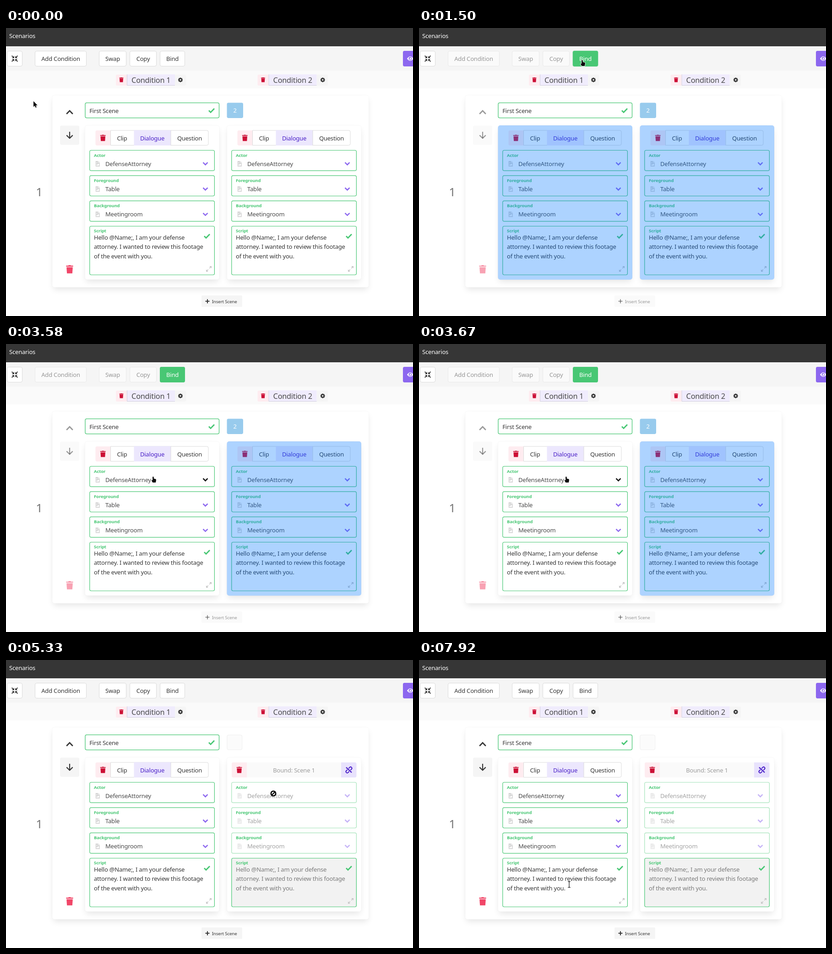
Animation, 889 px wide and 630 px high, one loop 8000 ms. Source, as an HTML page with a canvas:

```html
<!DOCTYPE html>
<html lang="en">
<head>
<meta charset="utf-8">
<title>Scenarios</title>
<style>
html, body { margin: 0; width: 889px; height: 630px; overflow: hidden; background: #fff; }
canvas { display: block; }
</style>
</head>
<body>
<canvas id="stage" width="889" height="630"></canvas>
<script>
const c = document.getElementById('stage').getContext('2d');
const LOOP = 8000, PICK = 1490, LEFT_SET = 3250, BOUND = 4670;
const INK = '#363636', GREEN = '#48c774', PURPLE = '#8c67ef', DEEP = '#4a20c8', RED = '#cc0f35', PINK = '#feecf0';
const STEP = 310, ROW = 55.3;

// pointer path: time, x, y
const PATH = [
  [0, 60, 160], [850, 341, 73], [1250, 357, 70], [2340, 357, 70], [2580, 333, 235], [2670, 329, 263],
  [3100, 322, 290], [3830, 322, 290], [4000, 632, 284], [4250, 583, 290], [5270, 583, 290], [5330, 584, 292],
  [6190, 584, 292], [6330, 500, 180], [6500, 300, 62], [6580, 269, 37], [7000, 131, 162],
  [7400, 500, 300], [7830, 321, 488], [7920, 328, 491], [8000, 328, 491]
];

const clamp = v => Math.max(0, Math.min(1, v));
const ramp = (t, a, b) => clamp((t - a) / (b - a));

// monotone cubic through the path points
function slope(i, k) {
  if (i < 1 || i > PATH.length - 2) return 0;
  const rate = j => (PATH[j + 1][k] - PATH[j][k]) / (PATH[j + 1][0] - PATH[j][0]);
  const a = rate(i - 1), b = rate(i);
  return a * b <= 0 ? 0 : 2 * a * b / (a + b);
}
function pointer(t) {
  t = Math.max(0, t);
  let i = 0;
  while (i < PATH.length - 2 && t > PATH[i + 1][0]) i++;
  const p = PATH[i], q = PATH[i + 1], h = q[0] - p[0], u = clamp((t - p[0]) / h), v = 1 - u;
  return [1, 2].map(k => v * v * (1 + 2 * u) * p[k] + u * u * (3 - 2 * u) * q[k]
    + h * u * v * (v * slope(i, k) - u * slope(i + 1, k)));
}
const inside = (p, x, y, w, h) => p[0] >= x && p[0] < x + w && p[1] >= y && p[1] < y + h;

function fade(a, draw) {
  c.save();
  c.globalAlpha *= a;
  draw();
  c.restore();
}
function at(x, y, draw) {
  c.save();
  c.translate(x, y);
  draw();
  c.restore();
}
function box(x, y, w, h, r, fill, line, lw = 1) {
  c.beginPath();
  c.roundRect(x, y, w, h, r);
  if (fill) { c.fillStyle = fill; c.fill(); }
  if (line) { c.strokeStyle = line; c.lineWidth = lw; c.stroke(); }
}
function text(s, x, y, size = 13.44, color = INK, align = 'left', weight = 400) {
  c.font = `${weight} ${size * .97}px "Noto Sans", sans-serif`;
  c.letterSpacing = -.015 * size + 'px';
  c.textAlign = align;
  c.fillStyle = color;
  c.fillText(s, x, y);
}
function line(color, lw, ...pts) {
  c.beginPath();
  for (let i = 0; i < pts.length; i += 2) c.lineTo(pts[i], pts[i + 1]);
  c.strokeStyle = color;
  c.lineWidth = lw;
  c.stroke();
}
function poly(color, ...pts) {
  c.beginPath();
  for (let i = 0; i < pts.length; i += 2) c.lineTo(pts[i], pts[i + 1]);
  c.closePath();
  c.fillStyle = color;
  c.fill();
}
function card(x, y, w, h) {
  c.save();
  c.shadowColor = 'rgba(10,10,10,.1)';
  c.shadowBlur = 13.4;
  c.shadowOffsetY = 6.7;
  box(x + 1.7, y + 1.7, w - 3.4, h - 3.4, 5, '#fff');
  c.restore();
  box(x - .5, y - .5, w + 1, h + 1, 5, '#fff', 'rgba(10,10,10,.025)');
}

function trash(x, y, w, color) {
  at(x, y, () => {
    box(-w / 2, -w * .52, w, w * .14, w * .05, color);
    box(-w * .17, -w * .58, w * .34, w * .12, w * .04, color);
    poly(color, -w * .44, -w * .3, w * .44, -w * .3, w * .38, w * .57, -w * .38, w * .57);
  });
}
const check = (x, y) => line(GREEN, 2.8, x - 6, y + .3, x - 2, y + 4.2, x + 6, y - 4);
const chevron = (x, y, color) => line(color, 2.5, x - 5, y - 2.3, x, y + 2.7, x + 5, y - 2.3);

function gear(x, y) {
  at(x, y, () => {
    c.beginPath();
    c.arc(0, 0, 3, 0, 7);
    c.strokeStyle = INK;
    c.lineWidth = 2.5;
    c.stroke();
    for (let i = 0; i < 8; i++) {
      c.rotate(Math.PI / 4);
      line(INK, 2, 3, 0, 5.1, 0);
    }
  });
}
function docIcon(x, y) {
  poly('#d6d6d6', x - 4.6, y - 6, x + 1.5, y - 6, x + 4.6, y - 3, x + 4.6, y + 6, x - 4.6, y + 6);
  line('#fff', .9, x + 1.4, y - 6, x + 1.4, y - 2.8, x + 4.6, y - 2.8);
  poly('#fff', x - 3, y + 4, x - 3, y + 2.5, x - 1.5, y + 1, x - .5, y + 2, x + 2, y - .6, x + 3, y + .5, x + 3, y + 4);
  box(x - 3, y - 3, 2, 2, 1, '#fff');
}
function compress(x, y) {
  at(x, y, () => {
    for (let i = 0; i < 4; i++) {
      line(INK, 1.9, 1.6, 1.6, 6.4, 6.4);
      poly(INK, 1.1, 1.1, 6, 1.1, 1.1, 6);
      c.rotate(Math.PI / 2);
    }
  });
}
function expand(x, y) {
  at(x, y, () => {
    for (let i = 0; i < 2; i++) {
      line('#c4c4c4', 1.4, 1.2, -1.2, 5, -5);
      line('#c4c4c4', 1.4, 1.8, -5.2, 5.3, -5.2, 5.3, -1.8);
      c.rotate(Math.PI);
    }
  });
}
function unlink(x, y) {
  at(x, y, () => {
    c.save();
    c.rotate(-Math.PI / 4);
    box(-8, -2.8, 7.6, 5.6, 2.8, null, DEEP, 2);
    box(.4, -2.8, 7.6, 5.6, 2.8, null, DEEP, 2);
    c.restore();
    line('#e8e2fc', 4, -6, -6, 6, 6);
    line(DEEP, 2.2, -6, -5.6, 6, 5.6);
  });
}
function eye(x, y) {
  c.beginPath();
  c.moveTo(x - 7, y);
  c.quadraticCurveTo(x, y - 9.5, x + 7, y);
  c.quadraticCurveTo(x, y + 9.5, x - 7, y);
  c.fillStyle = '#fff';
  c.fill();
  box(x - 3.4, y - 3.4, 6.8, 6.8, 3.4, PURPLE);
  box(x - 2.2, y - 2.2, 4.4, 4.4, 2.2, '#fff');
  box(x - 2.2, y - 2.2, 2.2, 2.2, 1.1, PURPLE);
}

const BUTTONS = [['Add Condition', 63.5, 112], ['Swap', 203.5, 59], ['Copy', 270.5, 58], ['Bind', 336.5, 54]];

function toolbar(t, picking, hot) {
  box(0, 0, 889, 40, 0, INK);
  text('Scenarios', 7, 21.5, 13.44, '#fff');
  box(0, 40, 889, 53, 0, '#f5f5f5');
  box(0, 93, 889, 39, 0, '#fafafa');
  box(2.5, 50.5, 33, 33, 3.4, '#fff', '#dbdbdb');
  compress(19, 67);
  for (const [name, x, w] of BUTTONS) {
    const mid = x + w / 2;
    if (picking && name === 'Bind') {
      if (t < LEFT_SET) box(x - 1.4, 49.2, w + 2.8, 35.6, 4.5, 'rgba(72,199,116,.3)');
      box(x - .5, 50, w + 1, 34, 3.4, GREEN);
      text(name, mid, 72, 13.44, '#fff', 'center');
      continue;
    }
    const over = !picking && inside(hot, x, 50, w, 34);
    fade(picking ? .5 : 1, () => {
      box(x, 50.5, w, 33, 3.4, '#fff', over ? '#a8a8a8' : '#dbdbdb');
      text(name, mid, 72, 13.44, INK, 'center');
    });
  }
  box(867, 50, 40, 34, 3.4, PURPLE);
  eye(883, 67);
}

function heading(n) {
  const d = (n - 1) * 309.5;
  box(240 + d, 102, 24, 24, [3, 0, 0, 3], PINK);
  trash(252 + d, 113.3, 9, RED);
  box(369 + d, 102, 24.5, 24, [0, 3, 3, 0], '#f5f5f5');
  box(264.5 + d, 101.5, 104.5, 24, 0, '#f0ecfd');
  line('#d3d0de', 1, 264.5 + d, 101.5, 264.5 + d, 125.5, 369 + d, 125.5);
  text('Condition ' + n, 316.7 + d, 120, 16.8, '#4a4a4a', 'center');
  gear(381 + d * 1.004, 113.5);
}

function tabs() {
  box(195.5, 224, 33, 33, [3.4, 0, 0, 3.4], PINK);
  box(228.5, 224, 213.5, 32.5, [0, 3.4, 3.4, 0], '#fff', '#dbdbdb');
  box(279.5, 223.5, 80.5, 33.5, 0, '#ece7fd');
  line('#dbdbdb', 1, 360, 224, 360, 257);
  trash(211.7, 240.5, 12, RED);
  text('Clip', 253.5, 245.5, 13.44, INK, 'center');
  text('Dialogue', 319.5, 245.5, 13.44, DEEP, 'center');
  text('Question', 401, 245.5, 13.44, INK, 'center');
}
function boundBar() {
  box(183, 224, 33, 33, [3.4, 0, 0, 3.4], PINK);
  box(216, 224, 206, 33, 0, '#fafafa');
  box(422, 224, 33.5, 33, [0, 3.4, 3.4, 0], '#e8e2fc');
  trash(199.5, 240.5, 12, RED);
  text('Bound: Scene 1', 319, 245.5, 13.44, '#9c9c9c', 'center');
  unlink(439, 240.5);
}

const FIELDS = [['Actor', 'DefenseAttorney'], ['Foreground', 'Table'], ['Background', 'Meetingroom']];
const LINES = ['Hello @Name;, I am your defense', 'attorney. I wanted to review this footage', 'of the event with you.'];
const label = (s, y) => text(s, 192, y, 9.9, GREEN, 'left', 600);

function panel(bound, hot) {
  card(173, 213.5, 292.5, 336.5);
  bound ? boundBar() : tabs();
  FIELDS.forEach(([name, value], i) => {
    const y = 267.5 + i * ROW;
    const over = hot && inside(hot, 182, y, 273, 45);
    fade(bound ? .5 : 1, () => {
      box(182.8, y, 272.6, 44.7, 3.4, '#fff', GREEN, 1.2);
      docIcon(200.3, y + 29.5);
      text(value, 217, y + 34, 13.44, '#4a4a4a');
      chevron(435.5, y + 29, over ? '#111' : PURPLE);
    });
    label(name, y + 14);
  });
  box(182.8, 433.5, 272.6, 106.5, 3.4, bound ? '#f2f2f2' : '#fff', GREEN, 1.2);
  label('Script', 447.3);
  LINES.forEach((s, i) => text(s, 192, 463.3 + i * 20.16, 13.44, bound ? '#7a7a7a' : INK));
  check(439, 455);
  expand(443, 527);
}
function veil(amount) {
  if (amount > 0) {
    c.save();
    c.shadowColor = 'rgba(50,120,240,.6)';
    c.shadowBlur = 4;
    box(172.6, 213.2, 293.2, 337.4, 5, null, 'rgba(90,160,245,.55)', 1.6);
    c.restore();
  }
  box(172.5, 213, 293.5, 337.5, 5, `rgba(0,${120 + 7 * amount},255,${.32 + .07 * amount})`);
}

function tooltip(a) {
  fade(a, () => {
    box(522, 167, 158.5, 26.5, 4, '#3298dc');
    poly('#3298dc', 518, 180, 522, 176, 522, 184);
  });
  fade(Math.min(1, a * 4), () => text('Bound across all conditions', 601, 184.3, 11.4, '#fff', 'center'));
}

function sceneCard(t, picking, bound, hot) {
  card(101.5, 147.5, 690.5, 419.5);
  card(101.5, 628.5, 690.5, 200);
  text('1', 72.5, 368, 26.9, '#757575', 'center');
  fade(picking ? .5 : 1, () => {
    line(INK, 2.7, 132.2, 188, 139, 181, 145.8, 188);
    box(118, 213.5, 42, 42, 3.4, '#f5f5f5');
    line(INK, 2.2, 139, 227, 139, 241);
    line(INK, 2.2, 132.3, 234.6, 139, 241.2, 145.7, 234.6);
    trash(139, 527.8, 15.5, '#f14668');
    box(427, 585, 89, 25, 2, '#f5f5f5');
    line(INK, 2, 435.5, 597.7, 444.5, 597.7);
    line(INK, 2, 440, 593.2, 440, 602.2);
    text('Insert Scene', 449.7, 601.5, 10.08);
  });
  box(173, 163.7, 292.5, 33, 3.4, '#fff', GREEN, 1.3);
  text('First Scene', 182.3, 185.5);
  check(449, 180.2);
  if (bound) {
    box(482.8, 164, 33, 32.5, 3.4, '#fbfbfb', '#efefef');
  } else {
    box(482.5, 163.5, 35.5, 33.5, 3.4, '#98cbed');
    text('2', 500, 185.3, 13.44, '#fff', 'center');
  }
  const leftVeil = picking ? 1 - ramp(t, LEFT_SET, LEFT_SET + 160) : 0;
  panel(false, leftVeil ? null : hot);
  if (leftVeil) fade(leftVeil, () => veil(ramp(t, 2580, 3050)));
  at(STEP, 0, () => {
    panel(bound, null);
    if (picking) veil(ramp(t, 4040, 4400));
  });
  const tip = t < 6470 ? ramp(t, 6330, 6470) * .5 : .5 * (1 - ramp(t, 6470, 6660));
  if (tip > 0) tooltip(tip);
}

function arrow() {
  c.beginPath();
  [0, 0, 0, 12.6, 2.9, 10, 4.8, 14.2, 6.8, 13.3, 5, 9.3, 8.8, 9.2]
    .forEach((v, i, a) => i % 2 || c.lineTo(v, a[i + 1]));
  c.closePath();
}
function hand() {
  c.beginPath();
  c.moveTo(-1.9, 1);
  c.quadraticCurveTo(-.6, -.8, .6, 1);
  c.lineTo(.9, 4.6);
  c.lineTo(4.6, 5.3);
  c.quadraticCurveTo(6.2, 5.8, 5.9, 8);
  c.lineTo(5, 13);
  c.lineTo(-1.6, 13);
  c.lineTo(-4.2, 8.6);
  c.quadraticCurveTo(-3.6, 6.8, -1.8, 8.2);
  c.closePath();
}
function solid(shape) {
  shape();
  c.lineJoin = 'round';
  c.strokeStyle = '#fff';
  c.lineWidth = 1.6;
  c.stroke();
  c.fillStyle = '#0a0a0a';
  c.fill();
}
const cursors = {
  arrow: () => solid(arrow),
  hand: () => solid(hand),
  no() {
    box(-7.2, -7.2, 14.4, 14.4, 7.2, '#fff');
    box(-5.1, -5.1, 10.2, 10.2, 5.1, '#fff', '#0a0a0a', 2.9);
    line('#0a0a0a', 2.2, -3.6, 3.6, 3.6, -3.6);
  },
  beam() {
    for (const [color, lw] of [['#fff', 3], ['#222', 1.3]]) {
      line(color, lw, 0, -6, 0, 6);
      line(color, lw, -2.8, -6.7, -.6, -6.5, 0, -5.8, .6, -6.5, 2.8, -6.7);
      line(color, lw, -2.8, 6.7, -.6, 6.5, 0, 5.8, .6, 6.5, 2.8, 6.7);
    }
  }
};
function cursorKind(p, picking) {
  const live = picking ? BUTTONS.slice(3) : BUTTONS;
  if (live.some(([, x, w]) => inside(p, x, 50, w, 34))) return 'hand';
  if (inside(p, 483, 213, 293, 337)) return 'no';
  if (picking) return inside(p, 173, 213, 293, 337) ? 'hand' : 'arrow';
  if (inside(p, 173, 164, 293, 33) || inside(p, 182, 433, 273, 107)) return 'beam';
  if (inside(p, 195, 224, 247, 33)) return 'hand';
  return FIELDS.some((f, i) => inside(p, 182, 267 + i * ROW, 273, 45)) ? 'hand' : 'arrow';
}

function frame(now) {
  const t = now % LOOP;
  const picking = t >= PICK && t < BOUND, bound = t >= BOUND;
  const pos = pointer(t), hot = pointer(t - 80);
  c.fillStyle = '#fff';
  c.fillRect(0, 0, 889, 630);
  toolbar(t, picking, hot);
  heading(1);
  heading(2);
  sceneCard(t, picking, bound, hot);
  at(pos[0], pos[1], cursors[cursorKind(pos, picking)]);
  requestAnimationFrame(tick);
}
const start = performance.now();
const tick = () => frame(performance.now() - start);
tick();
</script>
</body>
</html>
```
